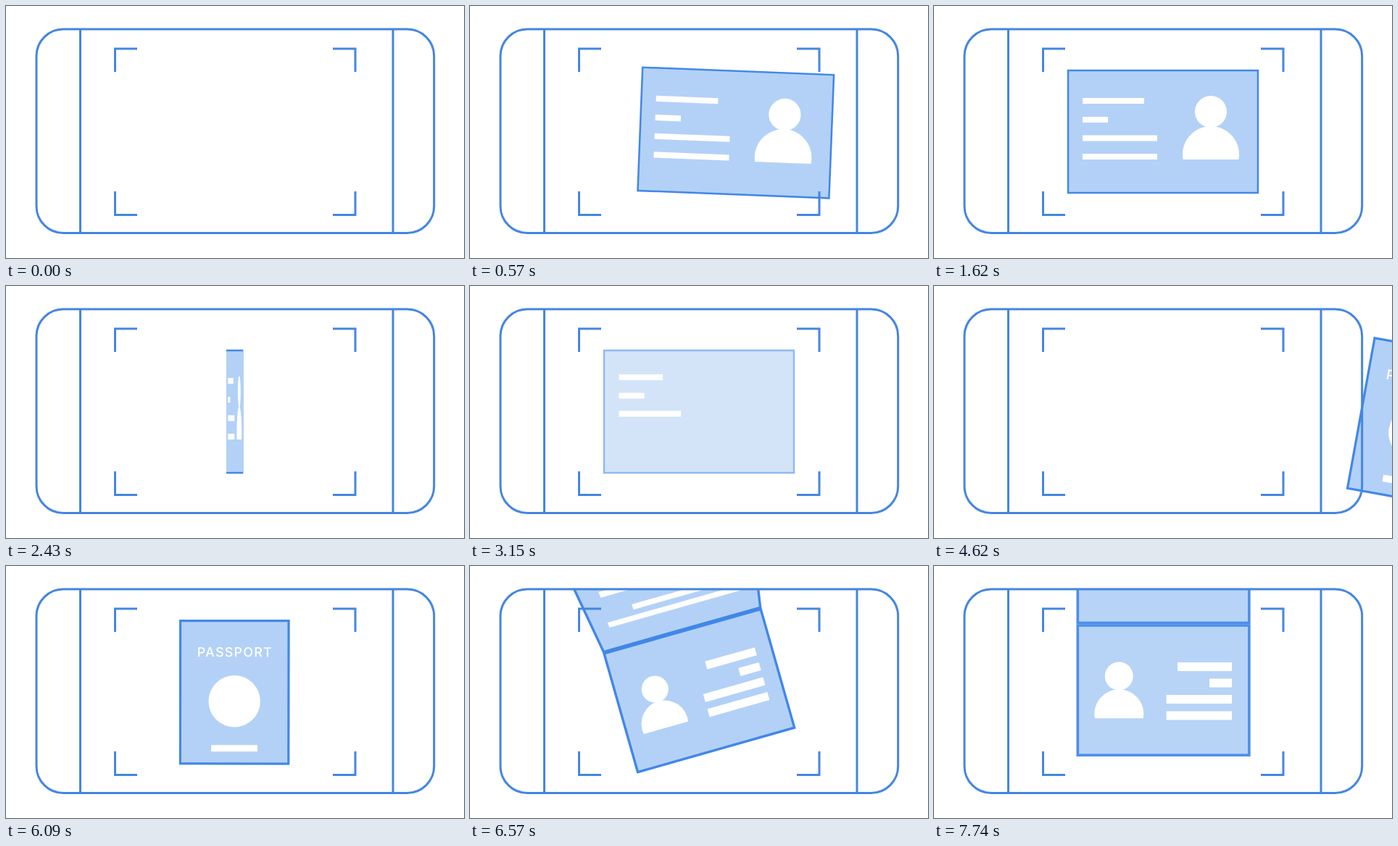
Recreate the animation shown at these times as an HTML page. Size 632 by 348 pixels, loop 8 s.

```html
<!DOCTYPE html>
<html lang="en">
<head>
<meta charset="utf-8">
<title>Document scan</title>
<style>
  html, body { margin: 0; width: 100%; height: 100%; overflow: hidden; background: #fff; }
  svg { display: block; width: 100%; height: 100%; }
  .line { fill: none; stroke: #4486e1; stroke-width: 3; }
  .sheet { fill: #b3d1f6; stroke: #4287e8; stroke-width: 3; }
  .white { fill: #fff; }
  text { font: 500 18px Inter, "Open Sans", sans-serif; letter-spacing: 1.2px; text-anchor: middle; }
</style>
</head>
<body>
<svg viewBox="0 0 632 348">
  <defs><clipPath id="screen"><rect y="33" width="632" height="315"/></clipPath></defs>

  <g id="card">
    <rect class="sheet" x="-131" y="-84.5" width="262" height="169" style="stroke-width:2.5"/>
    <g id="cardFront" class="white"></g>
    <g id="cardBack" class="white"></g>
  </g>

  <g clip-path="url(#screen)">
    <g id="passport">
      <g id="page">
        <rect class="sheet" x="-118.3" y="-89.6" width="236.6" height="179.2" style="stroke-width:3.6"/>
        <g id="pageArt" class="white"></g>
      </g>
      <path id="cover" class="sheet" style="stroke-width:3.6"/>
      <path id="coverLines" class="white"/>
      <g id="coverArt"><g class="white" transform="rotate(90) scale(1.2)">
        <text x="0.6" y="-49">PASSPORT</text>
        <circle cy="12.5" r="35.7"/>
        <rect x="-32" y="73" width="64" height="9"/>
      </g></g>
    </g>
  </g>

  <g class="line">
    <rect x="42" y="32" width="548.7" height="281.5" rx="37"/>
    <path d="M102.5 32V313.5M534 32V313.5"/>
    <path d="M181 59H150.5V91M451 59H482V91M181 288.5H150.5V256M451 288.5H482V256"/>
  </g>
</svg>
<script>
const LOOP = 8000;
const $ = id => document.getElementById(id);
const mix = (a, b, p) => a + (b - a) * p;
const ease = (t, start, end) => {
  const u = Math.min(1, Math.max(0, (t - start) / (end - start)));
  return u * u * (3 - 2 * u);
};
const place = (el, x, y, angle, sx, sy = sx) =>
  el.setAttribute('transform', `translate(${x} ${y}) rotate(${angle}) scale(${sx} ${sy})`);
const show = (el, on) => { el.style.display = on ? '' : 'none'; };

// Static artwork, each item relative to the centre of its sheet
const bars = (list, h) =>
  list.map(([x, y, w]) => `<rect x="${x}" y="${y}" width="${w}" height="${h}"/>`).join('');
const person = (x, headY, headR, bodyY, r) => {
  const drop = r * 0.18, half = Math.sqrt(r * r - drop * drop);
  return `<circle cx="${x}" cy="${headY}" r="${headR}"/>` +
    `<path d="M${x - half} ${bodyY + drop}A${r} ${r} 0 1 1 ${x + half} ${bodyY + drop}Z"/>`;
};
$('cardFront').innerHTML = person(66, -27.5, 22, 31.5, 39) +
  bars([[-111, -46.5, 85], [-111, -20.5, 35], [-111, 5, 103], [-111, 30.5, 103]], 8);
$('cardBack').innerHTML =
  bars([[-110.5, -51.5, 60.5], [-110.5, -26, 35], [-110.5, -1, 85.5]], 8);
$('pageArt').innerHTML = person(-61.3, -19.5, 19.5, 32.6, 34) +
  bars([[19.5, -38.5, 75], [63.5, -16, 31], [4, 6.5, 90.5], [4, 29, 90.5]], 12);

// Scan blink: quick dip in opacity, slower recovery
function blink(t, start, rest = 1) {
  const steps = [[-30, 1], [0, 0.58], [60, 0.42], [360, rest]];
  const d = t - start;
  if (d <= -30) return 1;
  for (let i = 1; i < steps.length; i++) {
    const [a, from] = steps[i - 1], [b, to] = steps[i];
    if (d < b) return mix(from, to, (d - a) / (b - a));
  }
  return rest;
}

function drawCard(t) {
  const away = 1 - ease(t, 90, 690);
  const leave = ease(t, 3720, 4360);
  const turn = Math.cos(Math.PI * ease(t, 2200, 2680));
  place($('card'), 316 + 496 * away - 486 * leave, 173.5 + 15 * away,
    22 * away - 20 * leave, (1 + 0.08 * away) * Math.abs(turn), 1 + 0.08 * away);
  show($('card'), t < 4400);
  show($('cardFront'), turn > 0);
  show($('cardBack'), turn <= 0);
  $('card').style.opacity = t < 2200 ? blink(t, 1230) : blink(t, 3150);
}

const DEPTH = 1000, HALF_W = 118.3, HALF_H = 89.6;
const coverBars = [[-96, 94, 58], [-56, 94, 82], [0, 94, 104], [-91, -25, 125]];

function drawPassport(t) {
  const away = 1 - ease(t, 4470, 4980);
  const turn = ease(t, 6080, 6750);
  const open = turn ** 1.85;
  const phi = Math.PI * (1 - open);
  const hinge = -HALF_H - 3.5 * open;

  // d is the distance from the hinge along the cover
  const project = (x, d) => {
    const f = DEPTH / (DEPTH - d * Math.sin(phi));
    return [x * f, hinge - d * Math.cos(phi) * f];
  };
  const quad = (x1, x2, d1, d2) =>
    'M' + [[x1, d1], [x2, d1], [x2, d2], [x1, d2]].map(p => project(...p).join(' ')).join('L') + 'Z';

  place($('passport'), mix(315.2, 316.6, turn) + 447 * away, mix(174.3, 171.6, turn) + 19.6 * away,
    90 * turn - 90 + 13 * away, mix(0.833, 1, open) * (1 + 0.088 * away));
  $('cover').setAttribute('d', quad(-HALF_W, HALF_W, 0, 2 * HALF_H));
  $('coverLines').setAttribute('d',
    coverBars.map(([a, b, d]) => quad(a, b, d - 6, d + 6)).join(''));

  const front = Math.cos(phi) < 0;
  const f = DEPTH / (DEPTH - HALF_H * Math.sin(phi));
  $('coverArt').setAttribute('transform',
    `translate(0 ${hinge}) scale(${f} ${-Math.cos(phi) * f}) translate(0 ${HALF_H})`);
  show($('coverArt'), front);
  show($('coverLines'), !front);
  show($('page'), turn > 0);
  show($('passport'), t > 4450);
  $('passport').style.opacity = blink(t, 7380, 0.94);
}

function frame(now) {
  const t = now % LOOP;
  drawCard(t);
  drawPassport(t);
  requestAnimationFrame(frame);
}
const begin = performance.now();
const tick = () => { frameAt(performance.now() - begin); requestAnimationFrame(tick); };
function frameAt(elapsed) {
  const t = elapsed % LOOP;
  drawCard(t);
  drawPassport(t);
}
tick();
</script>
</body>
</html>
```
